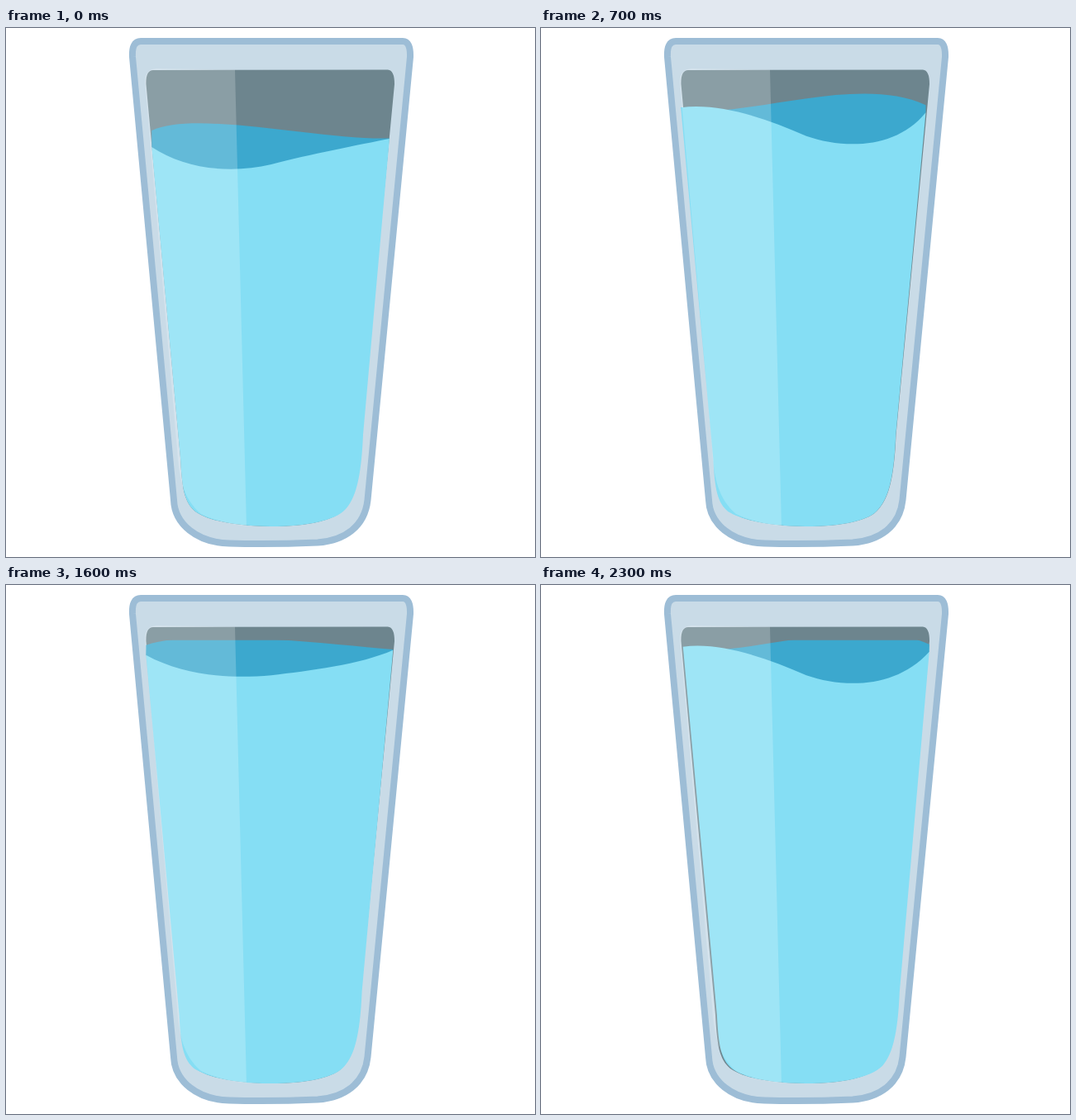
An HTML page that plays this animation: 640 by 640 pixels, repeating every 2.4 s.

```html
<!DOCTYPE html>
<html lang="en">
<head>
<meta charset="utf-8">
<title>Glass of water</title>
<style>
  html, body { margin: 0; width: 100%; height: 100%; overflow: hidden; background: #fff; }
  svg { display: block; width: 100vw; height: 100vh; }
</style>
</head>
<body>
<svg viewBox="0 0 640 640">
  <clipPath id="rim"><rect y="66.8" width="640" height="574"/></clipPath>
  <path fill="#c9dbe7" stroke="#9dbdd6" stroke-width="8"
    d="M153 35Q152 16 163 16H480Q489.5 16 489 35L437.5 571C434 603 410 620 377 622.5Q320 625 270 623.5C231 622.5 204 600 203 571Z"/>
  <path id="inside" fill="#6d858e"/>
  <path id="back" fill="#3ca8ce" clip-path="url(#rim)"/>
  <path id="front" fill="#85def4"/>
  <path fill="#fff" fill-opacity=".2"
    d="M277 50.5L182 49Q167.500 50 168 66L207 510C209 545 215 570 236 588C255 597 275 601 291 602.5Z"/>
</svg>
<script>
const LOOP = 2400, STEP = 100;

// Heights relative to the water level: two cubics in front, one at the back.
const leanLeft = { front: [-21, 5, 12, 0, -12, -24, -31], back: [-41, -66, -29, -31.5] };
const calm = { front: [-28, -4, -3, 0, 1, -2, -30], back: [-32, -48, -48, -31] };
const leanRight = { front: [-34.5, -40.5, -22.5, 0, 15.5, 16.5, -28.5], back: [-34.5, -14.5, -78, -37.5] };

const sway = [
  [0, leanLeft], [700, leanRight], [1000, calm],
  [1300, leanLeft], [1900, calm], [2300, leanRight]
];

const setPath = (id, d) => document.getElementById(id).setAttribute('d', d);
const mix = (a, b, k) => a.map((v, i) => v + (b[i] - v) * k);

const levelAt = t => Math.max(109.2, 165 - 0.049 * t);
const shiftAt = t => -3 * Math.sin(Math.PI * t / 1900);
const leftWall = y => 169.5 + 0.092 * (y - 70);
const rightWall = y => 470 - 0.092 * (y - 68);

function waveAt(t) {
  const n = Math.max(1, sway.findIndex(([time]) => time >= t));
  const [t0, a] = sway[n - 1], [t1, b] = sway[n];
  const k = (t - t0) / (t1 - t0);
  return { front: mix(a.front, b.front, k), back: mix(a.back, b.back, k) };
}

// First point, then cubic segments in groups of three.
function curve(xs, ys) {
  return xs.map((x, i) => (i === 0 ? 'M' : i % 3 === 1 ? 'C' : ' ') + x + ' ' + ys[i]).join('');
}

// Right wall, rounded base and left wall; l and r move the two sides.
function body(l, r) {
  return `L${432 + r} 492C${430 + r} 540 ${424 + r} 568 ${411 + r} 582` +
    `C398 596 365 603 320 603C275 603 243 595 ${229 + l} 585` +
    `C${216 + l} 574 ${213 + l} 558 ${211 + l} 520Z`;
}

function draw(t) {
  const level = levelAt(t), shift = shiftAt(t), wave = waveAt(t);
  const front = wave.front.map(y => y + level);
  const back = wave.back.map(y => y + level);
  const left = leftWall(front[0]) + shift;
  const right = rightWall(front[6]) + shift / 2;
  setPath('front', curve([left, 215, 270, 321, 366, 429, right], front) + body(shift, shift));
  setPath('back', curve([left, 230, 380, right], back) +
    `L${right} ${front[6]}L400 190H240L${left} ${front[0]}Z`);
}

function tick() {
  const t = performance.now() % LOOP;
  draw(Math.floor(t / STEP) * STEP);
  requestAnimationFrame(tick);
}

setPath('inside', 'M169.5 68Q169 51 178 51L462 50.5Q470 51 470 68' + body(0, -2.5));
tick();
</script>
</body>
</html>
```
